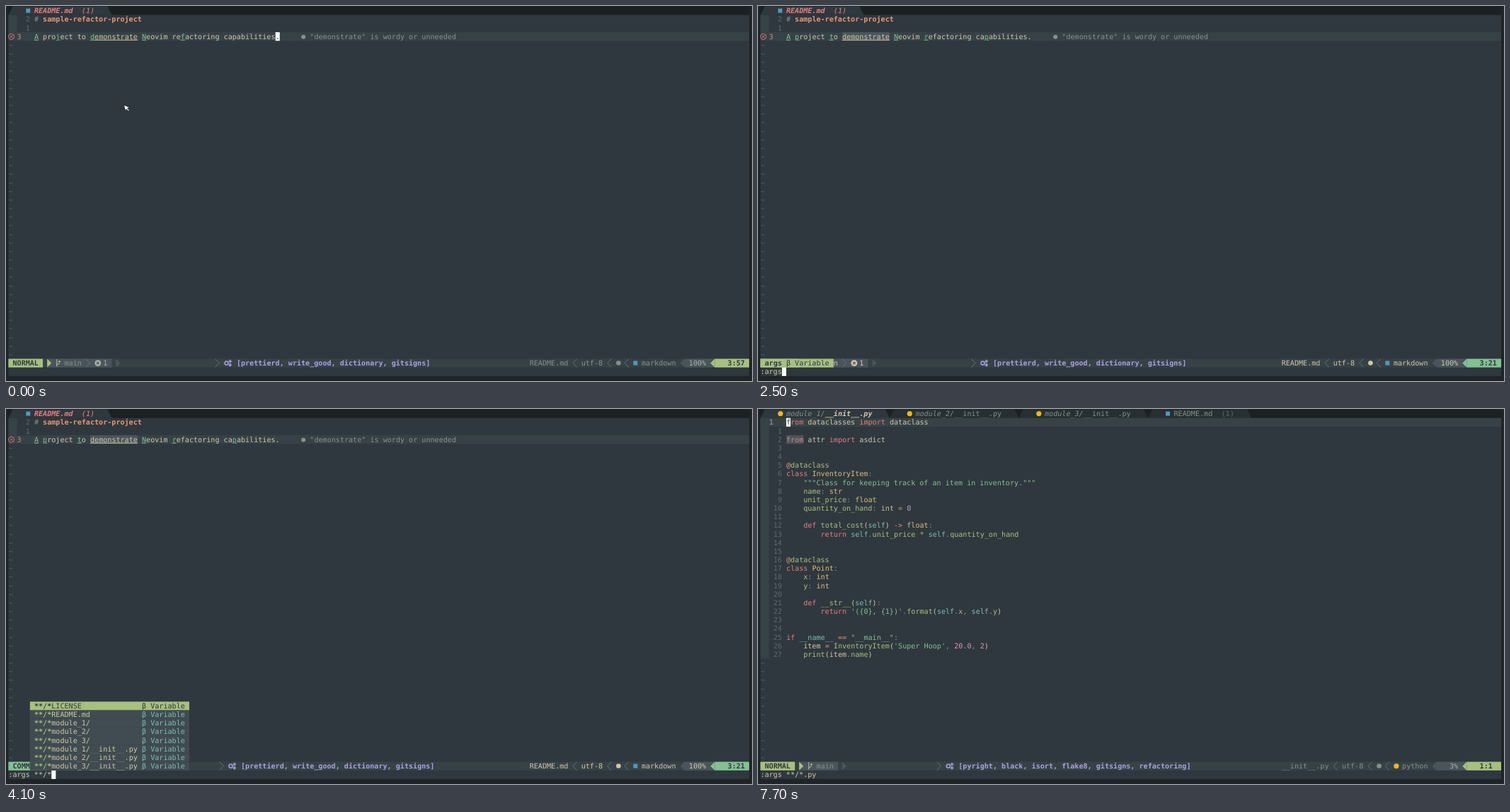
Animation, 1054 px wide and 531 px high, one loop 8000 ms. Source, as an HTML page:

```html
<!DOCTYPE html>
<html lang="en">
<head>
<meta charset="utf-8">
<title>Editor session</title>
<style>
  html, body { margin: 0; width: 100%; height: 100%; overflow: hidden; background: #1e2427; }
  svg { display: block; width: 1054px; height: 531px; }
  text {
    font: 10.107px "DejaVu Sans Mono", "Liberation Mono", monospace;
    white-space: pre;
    text-rendering: geometricPrecision;
  }
  .b { font-weight: bold; }
  .i { font-style: italic; }
  .u { text-decoration: underline; text-decoration-thickness: .8px; text-underline-offset: 1px; }
  .line { fill: none; stroke-width: .9; }
</style>
</head>
<body>
<svg id="stage" viewBox="0 0 1054 531"></svg>
<script>
const LOOP = 8000, CW = 6.085, RH = 12.17;
const BG = '#2f383e', BAR = '#1b2023', ROW = '#374247', SEG = '#4a555b', MENU = '#404c51';
const FG = '#d3c6aa', GREY = '#859289', DIM = '#5d696f', TILDE = '#566168';
const RED = '#e67e80', GREEN = '#a7c080', AQUA = '#83c092', BLUE = '#7fbbb3', LILAC = '#a9a1e1';
const MD = '#519aba', PY = '#f5b51c';

// Letters used after "~" in coloured lines
const INK = {
  f: FG, r: RED, o: '#e69875', y: '#dbbc7f', g: GREEN, a: AQUA, b: BLUE,
  p: '#d699b6', s: GREY, q: AQUA, u: FG
};

const X = c => 3.4 + c * CW;
const Y = r => .6 + r * RH;

const box = (r, c, w, fill, h = 1) =>
  `<rect x="${X(c)}" y="${Y(r)}" width="${w * CW}" height="${h * RH}" fill="${fill}"/>`;
const txt = (r, c, s, fill, cls = '') =>
  `<text x="${X(c)}" y="${Y(r) + 9.6}" fill="${fill}" class="${cls}">${s}</text>`;
const shape = (d, fill) => `<path d="${d}" fill="${fill}"/>`;
const stroke = (d, color) => `<path d="${d}" class="line" stroke="${color}"/>`;
const dot = (r, c, fill, size = 3.6) =>
  `<circle cx="${X(c) + 4}" cy="${Y(r) + 6}" r="${size}" fill="${fill}"/>`;
const chip = (r, c, fill) =>
  `<rect x="${X(c) + .6}" y="${Y(r) + 3}" width="6" height="6" fill="${fill}"/>`;
const caret = (r, c, ch = '') => box(r, c, 1, '#fff') + txt(r, c, ch, BG);

function rich(r, c, line) {
  const parts = line.split(/~(\w)/);
  let out = '';
  for (let i = 1; i < parts.length; i += 2) {
    out += txt(r, c, parts[i + 1], INK[parts[i]], 'qu'.includes(parts[i]) ? 'u' : '');
    c += parts[i + 1].length;
  }
  return out;
}

const layers = [];
const show = (from, to, html) => layers.push(`<g data-from="${from}" data-to="${to}">${html}</g>`);

function tab(c, w, fill) {
  return shape(`M${X(c)},${Y(1)}L${X(c + 1)},${Y(0)}L${X(c + w - 1)},${Y(0)}L${X(c + w)},${Y(1)}Z`, fill);
}

function tildes(first) {
  let out = '';
  for (let r = first; r <= 40; r++) out += txt(r, 0, '~', TILDE);
  return out;
}

// Status line pieces
const S = 41, MID = Y(S) + RH / 2;
const arrow = (c, fill) => shape(`M${X(c)},${Y(S)}l${CW},${RH / 2}l${-CW},${RH / 2}Z`, fill);
const backArrow = (c, fill) => shape(`M${X(c + 1)},${Y(S)}l${-CW},${RH / 2}l${CW},${RH / 2}Z`, fill);
const chevron = c => stroke(`M${X(c)},${Y(S)}l${CW - .5},${RH / 2}l${-CW + .5},${RH / 2}`, '#68747a');
const backChevron = c => stroke(`M${X(c + 1)},${Y(S)}l${-CW + .5},${RH / 2}l${CW - .5},${RH / 2}`, '#68747a');

function gear(x, y, r) {
  return `<circle cx="${x}" cy="${y}" r="${r}" fill="none" stroke="${LILAC}" stroke-width="1.3"/>` +
    `<circle cx="${x}" cy="${y}" r="${r + 1}" fill="none" stroke="${LILAC}" stroke-width="1" ` +
    `stroke-dasharray="${(r + 1) * Math.PI / 8}"/>`;
}

function crossDot(x, fill) {
  return `<circle cx="${x}" cy="${MID}" r="4.4" fill="${fill}"/>` +
    `<path d="M${x - 1.7},${MID - 1.7}l3.4,3.4m0,-3.4l-3.4,3.4" stroke="${SEG}" stroke-width="1.2"/>`;
}

function status(o) {
  const w = o.mode.length + 2, end = w + (o.error ? 16 : 10);
  const f = 121 + o.file.length, bx = X(w + 3) + 1.4, by = Y(S);
  let out = box(S, 0, 172, ROW) + box(S, 0, w, o.hue) + txt(S, 1, o.mode, BG, 'b');
  out += box(S, w + 1, end - w - 1, SEG) + arrow(w + 1, o.hue);
  out += stroke(`M${bx},${by + .5}v10.5m0,-2.5q3.8,-.8 3.8,-3.6v-2m-1.6,1.4l1.6,-1.6l1.2,1.6`, FG);
  out += txt(S, w + 5, 'main', o.ink);
  if (o.error) {
    out += chevron(w + 10) + crossDot(X(w + 12) + 4.7, o.icon) + txt(S, w + 14, '1', o.icon);
  }
  out += arrow(end + 1, SEG) + chevron(o.mid);
  const gx = X(o.mid + 2);
  out += gear(gx + 3.8, MID, 2.3) + gear(gx + 9, MID - 2.6, 1) + gear(gx + 9, MID + 2.6, 1);
  out += txt(S, o.mid + 5, o.tools, LILAC, 'b');
  out += txt(S, 121, o.file, o.ink) + backChevron(f + 1) + txt(S, f + 3, 'utf-8', o.ink);
  out += backChevron(f + 9) + dot(S, f + 11, o.ink, 3.3) + backChevron(f + 13);
  out += o.mark(S, f + 15) + txt(S, f + 17, o.lang, o.ink);
  out += backArrow(156, SEG) + box(S, 157, 7, SEG) + txt(S, 162 - o.part.length, o.part, o.icon);
  return out + backArrow(163, o.hue) + box(S, 164, 8, o.hue) + txt(S, 167, o.pos, BG, 'b');
}

// Completion menu, its last row on the status line
function menu(from, to, col, key, items, tail = '') {
  const len = Math.max(...items.map(s => s.length));
  let out = '';
  items.forEach((s, i) => {
    const r = 42 - items.length + i, ink = i ? FG : BG, hit = i ? GREEN : BG;
    const n = s.startsWith(key) ? key.length : 0, m = s.length - tail.length;
    out += box(r, col, len + 13, i ? MENU : GREEN);
    out += txt(r, col + 1, s.slice(0, n), hit, 'b') + txt(r, col + 1 + n, s.slice(n, m), ink);
    out += txt(r, col + 1 + m, s.slice(m), hit, 'b');
    out += txt(r, col + len + 2, 'β Variable', i ? BLUE : BG);
  });
  show(from, to, out);
}

// Markdown buffer
const base = `<rect width="1054" height="531" fill="#1e2427"/>` +
  box(0, 0, 172, BAR) + box(1, 0, 172, BG, 42);

show(0, 7700,
  tab(0, 24, BG) + chip(0, 4, MD) + txt(0, 6, 'README.md', RED, 'b i') + txt(0, 17, '(1)', RED, 'i') +
  box(1, 0, 2, ROW, 2) + box(3, 0, 172, ROW) +
  txt(1, 4, '2', DIM) + txt(2, 4, '1', DIM) + txt(3, 2, '3', RED) +
  `<circle cx="7.6" cy="43.3" r="4" fill="none" stroke="${RED}" stroke-width=".9"/>` +
  stroke('M6.1,41.8l3,3m0,-3l-3,3', RED) +
  txt(1, 6, '#', GREY) + txt(1, 8, 'sample-refactor-project', INK.o, 'b') +
  `<circle cx="420.2" cy="43.8" r="3" fill="${GREY}"/>` +
  txt(3, 70, '"demonstrate" is wordy or unneeded', GREY) + tildes(4));

show(0, 400, rich(3, 6,
  '~qA~f pro~qj~fect to ~qd~uemonstrate~f ~qN~feovim re~qf~factoring capabilities.'));
show(400, 7700, box(3, 19, 11, SEG) + rich(3, 6,
  '~qA~f ~qp~froject ~qt~fo ~udemonstrate~f ~qN~feovim ~qr~fefactoring ca~qp~fabilities.'));
show(0, 200, caret(3, 62, '.') +
  `<path d="M166.5,140.2l8,3.2l-3,1.4l2.6,2.8l-1.3,1.2l-2.6,-2.8l-1.4,2.8Z" fill="#fff" stroke="#1b2023" stroke-width=".7"/>`);
show(200, 1300, caret(3, 26, 'r'));

const md = {
  mode: 'NORMAL', hue: GREEN, ink: GREY, icon: '#a9b3a8', error: true, mid: 48,
  tools: '[prettierd, write_good, dictionary, gitsigns]',
  file: 'README.md', lang: 'markdown', mark: (r, c) => chip(r, c, MD), part: '100%', pos: '3:57'
};
show(0, 200, status(md));
show(200, 1300, status({ ...md, pos: '3:21' }));
show(1300, 7700, status({ ...md, mode: 'COMMAND', hue: AQUA, ink: FG, icon: FG, mid: 49, pos: '3:21' }));

// Typing on the command line
const CMD = ':args **/*.py';
const keys = [1300, 1800, 2100, 2300, 2400, 2900, 3200, 3400, 3600, 4100, 4400, 5200, 5300, 7400];
keys.slice(0, -1).forEach((at, i) => {
  const s = CMD.slice(0, i + 1);
  show(at, keys[i + 1], txt(42, 0, s, FG) + caret(42, s.length));
});
show(7400, 7700, txt(42, 0, CMD, FG) + caret(42, 0, ':'));

// Completion
const words = ('abbreviate abclear aboveleft all amenu anoremenu append argadd argdedupe argdelete ' +
  'argdo argedit argglobal arglocal args argument ascii augroup aunmenu autocmd packloadall').split(' ');
const top5 = ['LICENSE', 'README.md', 'module_1/', 'module_2/', 'module_3/'];
const inits = [1, 2, 3].map(n => `module_${n}/__init__.py`);
const all = [...top5, ...inits];
const site = 'venv/lib/python3.9/site-packages/';
const deep = [
  ...top5.slice(2), 'venv/', 'venv/bin/', 'venv/lib/', 'venv/lib/python3.9/', site,
  ...('attr/ attrs-21.2.0.dist-info/ black/ blackd/ blib2to3/ click/ flake8/ isort/ ' +
    'mccabe/ pathspec/ pip/ pycodestyle/ pyflakes/').split(' ').map(s => site + s)
];
const pre = (p, list) => list.map(s => p + s);

menu(1900, 2200, 0, 'a', words);
menu(2200, 2500, 0, 'ar', words.filter(s => s.startsWith('arg')));
menu(2500, 2900, 0, 'args', ['args']);
menu(2900, 3200, 5, '', top5);
menu(3200, 3400, 5, '*', pre('*', top5));
menu(3400, 3800, 5, '**', pre('**', all));
menu(3800, 4100, 5, '**/', pre('**/', deep));
menu(4100, 4400, 5, '**/*', pre('**/*', all));
menu(4400, 5300, 5, '**/*.', pre('**/*.', all));
menu(5300, 5600, 5, '**/*.', pre('**/*.', [...inits, ...inits]));
menu(5600, 5900, 5, '**/*.', pre('**/*.', [...inits, ...inits]), 'py');

// Python buffer
const code = `~rfrom ~fdataclasses ~rimport ~fdataclass

~rfrom ~fattr ~rimport ~fasdict


~o@~gdataclass
~rclass ~yInventoryItem~s:
~a    """Class for keeping track of an item in inventory."""
~g    name~s: ~ystr
~g    unit_price~s: ~yfloat
~g    quantity_on_hand~s: ~yint ~o= ~p0

~r    def ~gtotal_cost~f(~bself~f) ~o-> ~yfloat~s:
~r    return ~bself~s.~gunit_price ~o* ~bself~s.~gquantity_on_hand


~o@~gdataclass
~rclass ~yPoint~s:
~g    x~s: ~yint
~g    y~s: ~yint

~r    def ~g__str__~f(~bself~f)~s:
~r    return ~a'({0}, {1})'~s.~gformat~f(~bself~s.~gx~s, ~bself~s.~gy~f)


~rif ~b__name__ ~o== ~a"__main__"~s:
~f    item ~o= ~gInventoryItem~f(~a'Super Hoop'~s, ~p20.0~s, ~p2~f)
~g    print~f(~fitem~s.~gname~f)`.replace(/~r    return/g, '~r        return').split('\n');

let py = tab(0, 30, BG) + tab(30, 30, '#272f33') + tab(60, 30, '#272f33') + tab(90, 24, '#272f33');
for (let n = 0; n < 3; n++) {
  const c = n * 30;
  py += dot(0, c + 4, PY) + txt(0, c + 6, `module_${n + 1}/`, GREY, 'i') +
    txt(0, c + 15, '__init__.py', n ? GREY : FG, n ? '' : 'b i');
}
py += chip(0, 94, MD) + txt(0, 96, 'README.md', GREY) + txt(0, 107, '(1)', DIM);
py += box(1, 0, 2, ROW, 28) + box(1, 0, 172, ROW) + box(3, 6, 4, SEG);
code.forEach((line, i) => {
  py += i ? txt(i + 1, i < 10 ? 4 : 3, i, DIM) : txt(1, 2, '1', '#9da9a0');
  py += rich(i + 1, 6, line);
});
py += caret(1, 6, 'f') + tildes(29) + txt(42, 0, CMD, FG);
py += status({
  ...md, error: false, mid: 41, tools: '[pyright, black, isort, flake8, gitsigns, refactoring]',
  file: '__init__.py', lang: 'python', mark: (r, c) => dot(r, c, PY), part: '3%', pos: '1:1'
});
show(7700, LOOP, py);

const stage = document.getElementById('stage');
stage.innerHTML = base + layers.join('');
const groups = [...stage.querySelectorAll('g')].map(el => ({ el, from: +el.dataset.from, to: +el.dataset.to }));
const start = performance.now();

function draw() {
  const t = Math.max(0, performance.now() - start) % LOOP;
  for (const g of groups) g.el.style.display = t >= g.from && t < g.to ? '' : 'none';
  requestAnimationFrame(draw);
}
draw();
</script>
</body>
</html>
```
